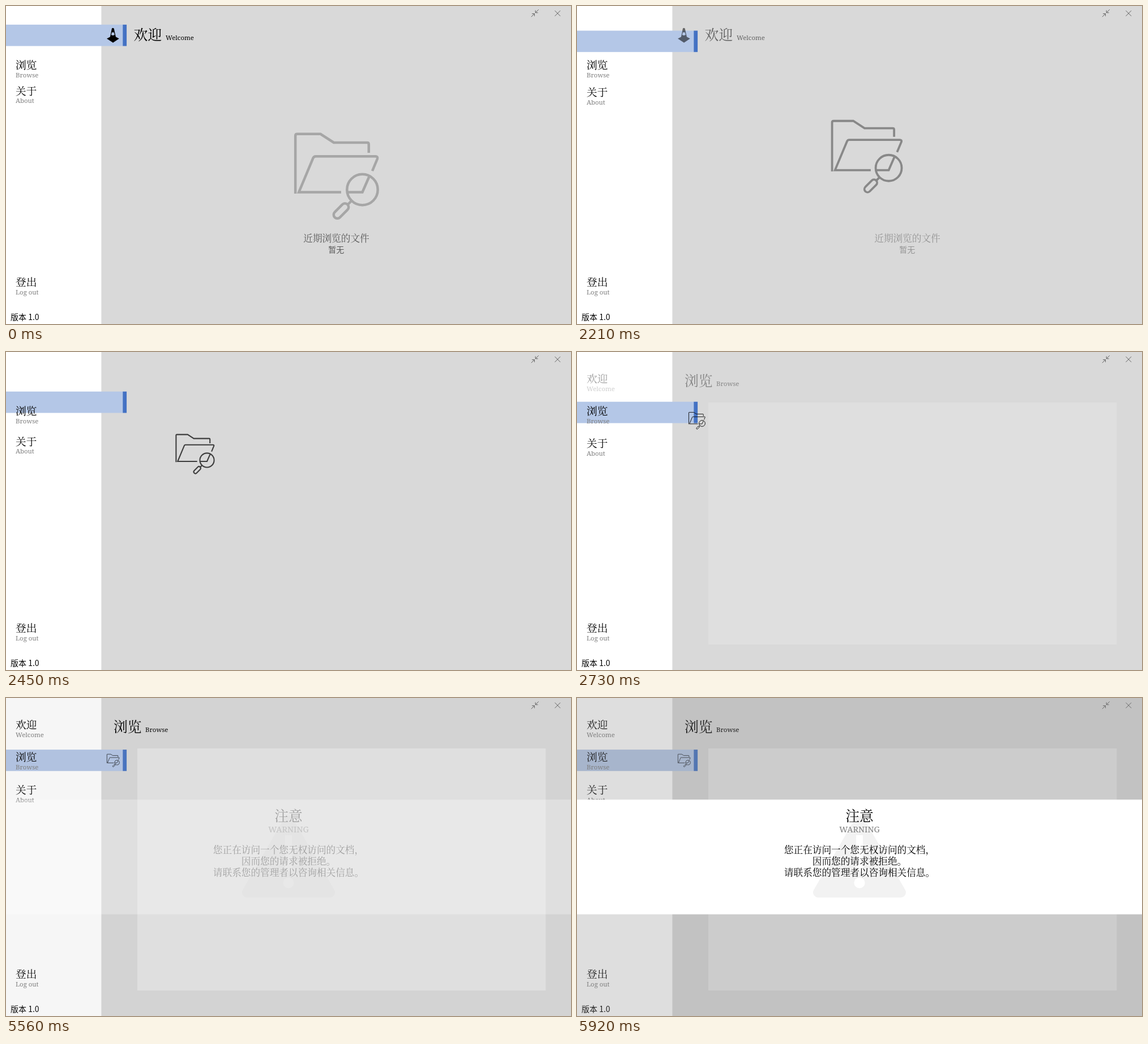
Animation, 998 px wide and 561 px high, one loop 8100 ms. Source, as an HTML page:

```html
<!DOCTYPE html>
<html lang="zh-CN">
<head>
<meta charset="utf-8">
<title>Navigation and warning</title>
<style>
html, body { margin: 0; width: 100%; height: 100%; overflow: hidden; background: #d9d9d9; }
svg { display: block; width: 998px; height: 561px; }
text { font-family: "Noto Serif CJK SC", "Source Han Serif SC", "Noto Sans CJK SC", "Noto Sans CJK", serif; white-space: pre; }
.head { font-size: 24.8px; }
.item { font-size: 18.7px; }
.body { font-size: 16.65px; }
.sans { font-family: "Noto Sans CJK SC", "Noto Sans CJK", sans-serif; font-size: 14px; }
.en { font-family: "Noto Serif", serif; font-size: 11.4px; }
.grey { fill: #7f7f7f; }
.mid { text-anchor: middle; }
.line { fill: none; stroke: #555; stroke-width: .9; }
#folder { fill: none; stroke-width: 4.5; }
</style>
</head>
<body>
<svg viewBox="0 0 998 561">
  <rect width="998" height="561" fill="#d9d9d9"/>
  <rect width="168.4" height="561" fill="#fff"/>
  <path class="line" d="M969.5 8.2l9.6 9.6m0-9.6l-9.6 9.6"/>
  <path class="line" d="M940.8 6.2L935.2 11.8M935.2 7.6V11.8H939.6M927.8 19.2L933.4 13.6M929 13.6H933.4V18"/>

  <rect id="panel" class="in" x="232" y="89" width="721.3" height="427" fill="#e6e6e6"/>
  <g id="bar">
    <rect width="206.5" height="37.7" fill="#b4c7e7"/>
    <rect x="206.3" width="6.8" height="37.7" fill="#4472c4"/>
  </g>

  <g class="out">
    <path d="M178 57.4L184 54.4L189 57L194 54.4L199.8 57.4L189 64.8Z"/>
    <path d="M187 39.6Q188.8 37.8 190.6 39.6L194.3 56Q189 61 183.6 56Z"/>
    <path d="M187 46.5h3.7l1.2 4.6q-3 1.6-6.1 0z" fill="#b4c7e7"/>
    <text class="head" x="225.6" y="60.3">欢迎</text>
    <text class="en" x="282" y="60">Welcome</text>
    <g fill="#595959">
      <text class="body mid" x="583.5" y="415.7">近期浏览的文件</text>
      <text class="sans mid" x="583.3" y="434.8">暂无</text>
    </g>
  </g>

  <g class="in">
    <text class="head" x="190" y="60.3">浏览</text>
    <text class="en" x="246" y="60">Browse</text>
    <text class="item" x="17" y="54.4">欢迎</text>
    <text class="en grey" x="17" y="69">Welcome</text>
  </g>

  <text class="item" x="17" y="110.9">浏览</text>
  <text class="en grey" x="17" y="125.8">Browse</text>
  <g id="about">
    <text class="item" x="17" y="156.5">关于</text>
    <text class="en grey" x="17" y="171.4">About</text>
  </g>
  <text class="item" x="17" y="494.4">登出</text>
  <text class="en grey" x="17" y="509.3">Log out</text>
  <text class="sans" x="8" y="554">版本<tspan font-weight="300"> 1.0</tspan></text>

  <g id="folder">
    <path d="M511.2 331V229Q511.2 225.8 514.4 225.8H555.5L579 241H638Q640.8 241 640.8 244V259"/>
    <path d="M592 328.5H517.3L542.6 268Q544 265.2 547 265.2H652.5Q657.2 265.5 656 269.5L647 291"/>
    <path d="M604 328.5H629.5L641.5 301M610.5 343.5L604 350"/>
    <circle cx="629.5" cy="324" r="27.2"/>
    <rect x="576" y="355" width="32" height="13" rx="6.5" transform="rotate(-45 592 361.5)"/>
  </g>

  <rect id="shade" width="998" height="561" fill="#808080"/>
  <g id="warning">
    <rect y="179.3" width="998" height="202.3" fill="#fff"/>
    <path d="M499 217L426 343H572Z" fill="#f2f2f2" stroke="#f2f2f2" stroke-width="18" stroke-linejoin="round"/>
    <path d="M493 242h12v64h-12z" fill="#fff"/>
    <circle cx="499" cy="326" r="9.6" fill="#fff"/>
    <text class="head mid" x="499" y="217.4">注意</text>
    <text class="en grey mid" x="499" y="237.2" style="font-size:14.5px">WARNING</text>
    <g class="body mid">
      <text x="499" y="274.3">您正在访问一个您无权访问的文档，</text>
      <text x="499" y="294.1">因而您的请求被拒绝。</text>
      <text x="499" y="313.9">请联系您的管理者以咨询相关信息。</text>
    </g>
  </g>
</svg>
<script>
const LOOP = 8100, STEP = 40, MORPH = 2050, ALERT = 5560;
const $ = id => document.getElementById(id);
const clamp = v => Math.min(1, Math.max(0, v));
const mix = (a, b, p) => a + (b - a) * p;
const fade = (selector, v) =>
  document.querySelectorAll(selector).forEach(e => e.setAttribute("opacity", v));
const move = (id, value) => $(id).setAttribute("transform", value);
// Time since start, held for one step at a time
const since = (t, start) => Math.floor((t - start) / STEP) * STEP;

// Smooth start with a long, soft stop
function ease(u) {
  const s = 1 - (1 - u) ** 1.8;
  return s * s * (3 - 2 * s);
}

function draw(t) {
  const u = t < MORPH ? 0 : clamp((since(t, MORPH) + 10) / 1050);
  const p = ease(u);
  move("bar", `translate(0 ${mix(32.9, 91.1, p)})`);
  move("about", `translate(0 ${12.7 * p})`);
  move("folder", `translate(${mix(509, 178, p)} ${mix(223.5, 98.8, p)}) ` +
    `scale(${mix(1, .15, p)}) translate(-509 -223.5)`);
  const grey = Math.round(mix(166, 0, p));
  $("folder").setAttribute("stroke", `rgb(${grey},${grey},${grey})`);
  fade(".out", clamp(1 - u / .35));
  fade(".in", clamp((u - .45) / .55));

  const shown = t < ALERT ? 0 : clamp(.28 + .72 * since(t, ALERT) / 360);
  fade("#shade", .26 * shown);
  fade("#warning", shown);
}

const start = performance.now();
function tick() {
  draw((performance.now() - start) % LOOP);
  requestAnimationFrame(tick);
}
tick();
</script>
</body>
</html>
```
